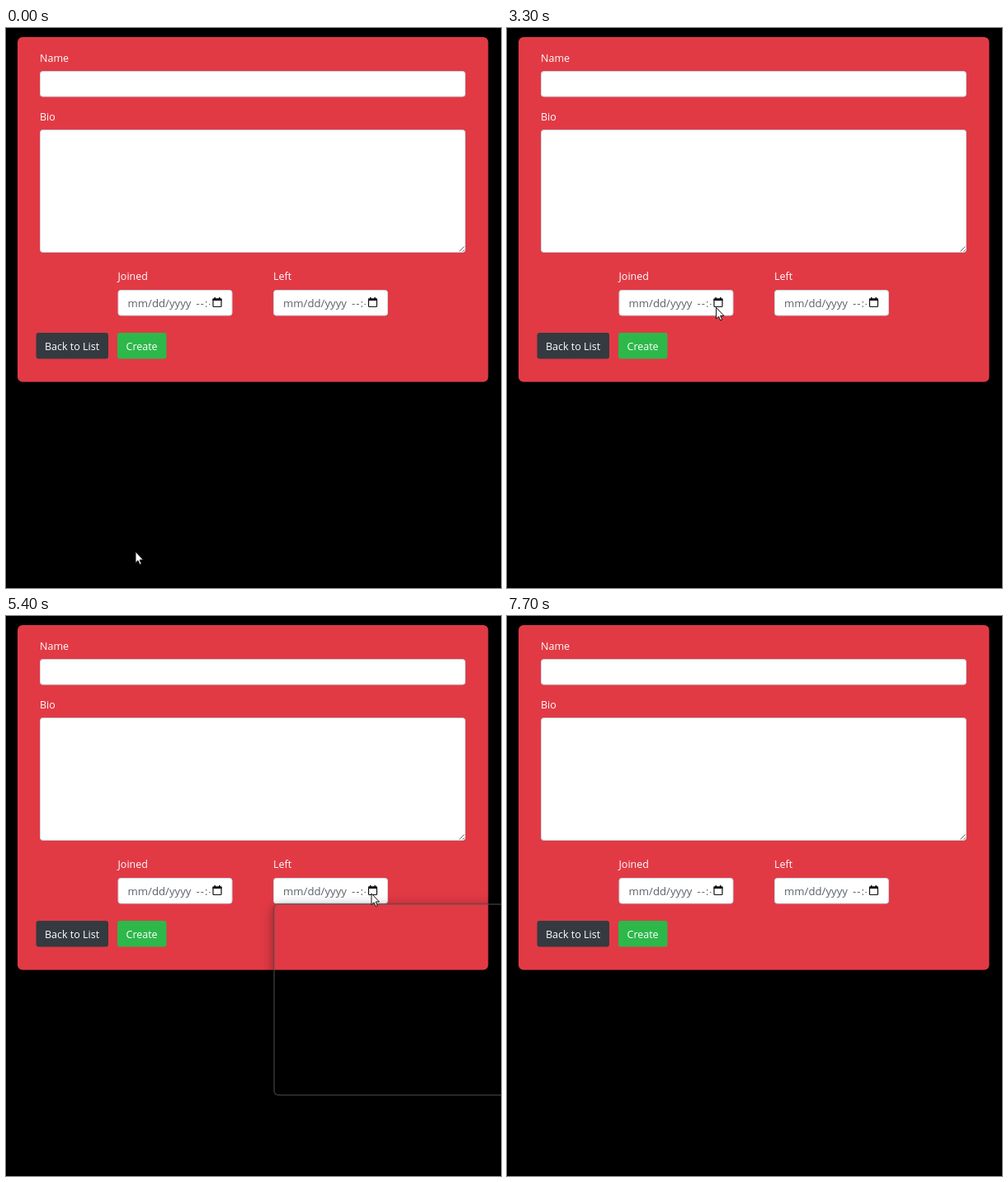
Animation of 600x678 px, one loop 7800 ms. Source, as an HTML page with a canvas:

```html
<!DOCTYPE html>
<html lang="en">
<head>
<meta charset="utf-8">
<title>Date picker form</title>
<style>
html, body { margin: 0; width: 100%; height: 100%; overflow: hidden; background: #000; }
canvas { display: block; }
</style>
</head>
<body>
<canvas id="stage" width="600" height="678"></canvas>
<script>
const ctx = document.getElementById('stage').getContext('2d');
const LOOP = 7800, STEP = 100;
const UI = '"Open Sans", "Noto Sans", sans-serif';
const ARIAL = '"Liberation Sans", Arial, sans-serif';
const BLUE = '#0a7aff', INK = '#111';
const ARROW = new Path2D('M0 0V13.6L3 10.8L5.2 15.6L7.2 14.7L5.1 10H9.4Z');

// The cursor rests at each stop and eases to the next
const STOPS = [
  { x: 157, y: 634, from: 0, to: 100 },
  { x: 158, y: 408, from: 800, to: 1600 },
  { x: 244, y: 437, from: 2300, to: 2600 },
  { x: 254, y: 334, from: 3400, to: 3800 },
  { x: 378, y: 315, from: 4200, to: 4500 },
  { x: 443, y: 336, from: 5200, to: 5900 }
];
const FIELDS = [
  { name: 'Joined', x: 135.5, open: 3600, close: 4500 },
  { name: 'Left', x: 324, open: 5400, close: 7400 }
];

const two = n => String(n).padStart(2, '0');
const series = (n, rule) => Array.from({ length: n }, (_, i) => rule(i));

function box(x, y, w, h, r, fill, stroke, width = 1) {
  ctx.beginPath();
  ctx.roundRect(x, y, w, h, r);
  if (fill) { ctx.fillStyle = fill; ctx.fill(); }
  if (stroke) { ctx.strokeStyle = stroke; ctx.lineWidth = width; ctx.stroke(); }
}

function text(s, x, y, font, color, align = 'left') {
  ctx.font = font;
  ctx.fillStyle = color;
  ctx.textAlign = align;
  ctx.fillText(s, x, y);
}

function line(path, color) {
  ctx.strokeStyle = color;
  ctx.lineWidth = 1;
  ctx.stroke(new Path2D(path));
}

const label = (s, x, y) => text(s, x, y, `12.5px ${UI}`, '#fff');
const field = (x, y, w, h) => box(x + .5, y + .5, w - 1, h - 1, 3, '#fff', '#ced4da');

function button(s, x, w, color) {
  box(x, 369, w, 31.5, 3, color);
  label(s, x + 10.5, 389.5);
}

function dateField({ name, x }) {
  const font = `13.2px ${UI}`, gray = '#5c6268';
  label(name, x, 305);
  field(x, 317, 139, 31.5);
  ctx.save();
  ctx.beginPath();
  ctx.rect(x, 317, 112, 31);
  ctx.clip();
  text('mm/dd/yyyy', x + 12, 337.5, font, gray);
  ctx.letterSpacing = '1px';
  text('--:--', x + 95, 337.5, font, gray);
  ctx.restore();
  box(x + 115.5, 328, 10, 9.5, 1, null, INK, 1.2);
  ctx.fillStyle = INK;
  ctx.fillRect(x + 115, 327.5, 11, 2.6);
  for (const tab of [117, 122.5]) ctx.fillRect(x + tab, 326, 1.5, 2);
}

function form() {
  box(14, 11, 570.5, 417.5, 6, '#e13a45');
  label('Name', 41, 40.5);
  field(41, 52, 516, 31.5);
  label('Bio', 41, 111.5);
  field(41, 123, 516, 149);
  line('M549.5 270.5l6-6M553.5 270.5l2-2', '#666');
  FIELDS.forEach(dateField);
  button('Back to List', 36.5, 87.5, '#343a40');
  button('Create', 135, 59.5, '#2db84a');
}

function calendar() {
  const font = `10px ${ARIAL}`, bold = `bold ${font}`;
  text('April 2023', 8.5, 22, bold, INK);
  ctx.fill(new Path2D('M59 16.5h6l-3 4Z'));
  line('M132.5 26.5v-13.5m-5.5 6l5.5-6l5.5 6M159 12.5v13.5m-5.5-6l5.5 6l5.5-6', '#333');

  const cell = (s, i, font, color) =>
    text(s, 20.3 + i % 7 * 23.15, 52.8 + Math.floor(i / 7) * 23.3, font, color, 'center');
  ['Su', 'Mo', 'Tu', 'We', 'Th', 'Fr', 'Sa'].forEach((d, i) => cell(d, i, font, INK));
  box(125.3, 85, 21.5, 21.5, 1, BLUE, INK, 1.7);
  for (let i = 0; i < 42; i++) {
    const date = new Date(2023, 2, 26 + i), day = date.getDate();
    const inMonth = date.getMonth() === 3, today = inMonth && day === 7;
    cell(day, i + 7, today ? bold : font, today ? '#fff' : inMonth ? INK : '#777');
  }
  text('Clear', 18, 218, font, '#0a72c4');
  text('Today', 134.8, 218, font, '#0a72c4');
}

function clock() {
  ctx.fillStyle = '#ccc';
  ctx.fillRect(179, .5, 1, 231);
  const hours = series(7, i => two(i || 12));
  const minutes = series(7, i => two(i + 2));
  [hours, minutes, ['PM', 'AM']].forEach((list, col) => {
    const x = 204.5 + col * 46.3;
    box(x - 21.5, 12, 43, 30, 1, BLUE);
    list.forEach((s, row) => text(s, x, 31.1 + row * 29.7,
      `${row ? '' : 'bold '}11.5px ${ARIAL}`, row ? '#222' : '#fff', 'center'));
  });
}

function picker(x, opening) {
  const w = 323, h = 232;
  ctx.save();
  ctx.translate(x + .5, 348.5);
  // Shadow falls only outside the panel
  ctx.save();
  ctx.beginPath();
  ctx.rect(-50, -50, w + 100, h + 100);
  ctx.roundRect(0, 0, w, h, 5);
  ctx.clip('evenodd');
  ctx.shadowColor = 'rgba(0,0,0,.4)';
  ctx.shadowBlur = 14;
  ctx.shadowOffsetY = 3;
  box(0, 0, w, h, 5, '#000');
  ctx.restore();
  if (opening) {
    box(.5, .5, w - 1, h - 1, 5, null, 'rgba(90,90,90,.6)', 1.5);
  } else {
    box(.5, .5, w - 1, h - 1, 5, '#fff', '#c4c4c4');
    calendar();
    clock();
  }
  ctx.restore();
}

function cursor(t) {
  const i = STOPS.findIndex(s => t < s.to);
  if (i < 0) return;
  const b = STOPS[i], a = STOPS[i - 1] || b;
  const u = t < b.from ? (t - a.to) / (b.from - a.to) : 1;
  const ease = u * u * (3 - 2 * u);
  ctx.save();
  ctx.translate(a.x + (b.x - a.x) * ease, a.y + (b.y - a.y) * ease);
  ctx.fillStyle = '#fff';
  ctx.fill(ARROW);
  line(ARROW, INK);
  ctx.restore();
}

function draw(now) {
  const t = Math.floor(now % LOOP / STEP) * STEP;
  ctx.fillStyle = '#000';
  ctx.fillRect(0, 0, 600, 678);
  form();
  for (const { x, open, close } of FIELDS)
    if (t >= open && t < close) picker(x, t === open);
  cursor(t);
}

const start = performance.now();
function frame() {
  draw(performance.now() - start);
  requestAnimationFrame(frame);
}
frame();
</script>
</body>
</html>
```
